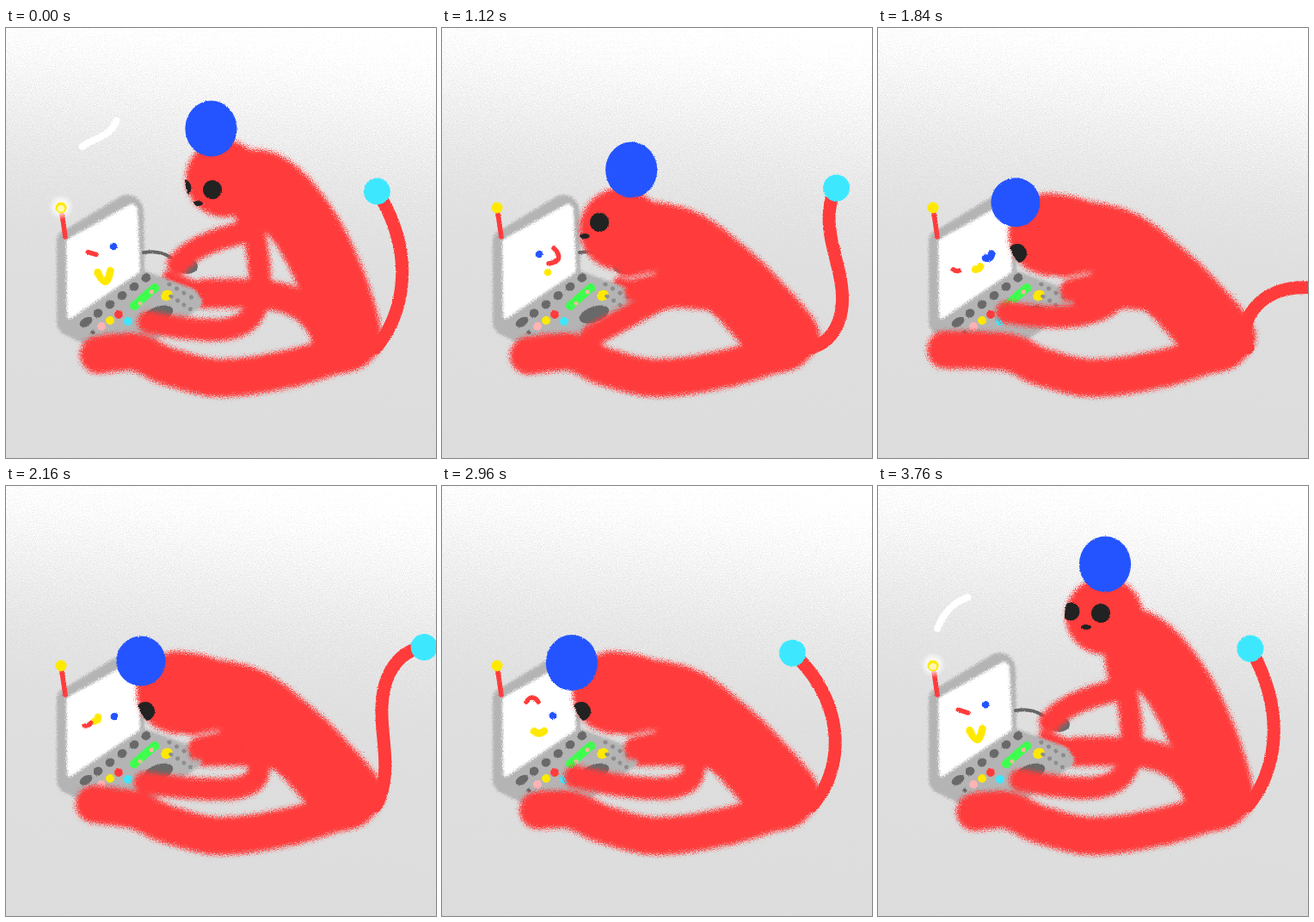
Animation, 500 px wide and 500 px high, one loop 3840 ms. Source, as an HTML page:

```html
<!DOCTYPE html>
<html lang="en">
<head>
<meta charset="utf-8">
<title>Laptop creature</title>
<style>
  html, body { margin: 0; height: 100%; overflow: hidden; background: #fff; }
  svg { display: block; width: 100vw; height: 100vh; }
  .line { fill: none; stroke-linecap: round; stroke-linejoin: round; }
  .red { stroke: #ff3b3b; }
</style>
</head>
<body>
<svg viewBox="0 0 500 500">
  <defs>
    <linearGradient id="sky" x1=".55" y1="0" x2=".45" y2="1">
      <stop offset=".18" stop-color="#fff"/>
      <stop offset=".3" stop-color="#f0f0f0"/>
      <stop offset=".42" stop-color="#e3e3e3"/>
      <stop offset=".55" stop-color="#dedede"/>
      <stop offset="1" stop-color="#dcdcdc"/>
    </linearGradient>
    <radialGradient id="shine">
      <stop offset=".3" stop-color="#fff"/>
      <stop offset="1" stop-color="#fff" stop-opacity="0"/>
    </radialGradient>
    <clipPath id="faceClip"><circle id="faceEdge"/></clipPath>
  </defs>

  <rect x="-100" y="-100" width="700" height="700" fill="url(#sky)" filter="url(#grain)"/>

  <g filter="url(#soft)">
    <path id="tail" class="line red" stroke-width="15"/>
    <circle id="tip" r="15.5" fill="#3de8ff"/>
  </g>

  <g filter="url(#fuzzy)" class="line red">
    <path d="M372 355C345 310 320 307 229 309" stroke-width="34"/>
    <path id="farFoot" stroke-width="16"/>
  </g>

  <g filter="url(#rough)" stroke-linejoin="round">
    <path d="M70 349 160 290 215 310 221 319 165 360 124 375Z" fill="#b4b4b4" stroke="#b4b4b4" stroke-width="15"/>
    <path d="M71 247 138 207Q147 203 148 215L149 284 71 343Z" fill="#b4b4b4" stroke="#b4b4b4" stroke-width="24"/>
    <path d="M73 248 145 208Q150 207 150 214L153 282 74 335Z" fill="#fff" stroke="#fff" stroke-width="6"/>
  </g>
  <g filter="url(#soft)">
    <g id="keys"></g>
    <path class="line" d="M149 323 173 302" stroke="#3dff4d" stroke-width="10"/>
    <g fill="#f5b8a0"><circle cx="156" cy="320" r="2.5"/><circle cx="169" cy="307" r="2.5"/></g>
    <ellipse cx="177" cy="333" rx="18" ry="9" fill="#696969" transform="rotate(-20 177 333)"/>
    <path class="line" d="M160 261Q178 258 192 267" stroke="#666" stroke-width="4"/>
    <ellipse cx="211" cy="277" rx="12" ry="9" fill="#696969"/>
    <g class="line">
      <path id="yellow" stroke="#ffe900" stroke-width="8.5"/>
      <path id="blue" stroke="#2454ff" stroke-width="8.5"/>
      <path id="red" class="red" stroke-width="5.5"/>
    </g>
    <path class="line red" d="M69 243 65 216" stroke-width="5.5"/>
    <circle id="glow" cx="64" cy="208" r="15" fill="url(#shine)"/>
    <circle cx="64" cy="209" r="6.5" fill="#ffe900"/>
    <circle id="spark" cx="64" cy="210" r="4" fill="#fff9b0"/>
    <path id="signal" class="line" d="M64 200C62 165 80 138 103 130 128 120 132 108 132 77" stroke="#fff" stroke-width="8" stroke-dasharray="52 1000"/>
    <circle id="puff" cx="132" cy="77" fill="#fff"/>
  </g>

  <g filter="url(#fuzzy)" fill="#ff3b3b">
    <path id="farArm" class="line red" stroke-width="26"/>
    <path id="torso"/>
    <circle id="head"/>
  </g>
  <g filter="url(#soft)">
    <g clip-path="url(#faceClip)" fill="#222">
      <circle id="eye" r="11"/>
      <circle id="eye2" r="10.5"/>
      <ellipse id="mouth" rx="6" ry="3"/>
    </g>
    <ellipse id="pompom" fill="#2454ff"/>
  </g>
  <g filter="url(#fuzzy)" class="line red">
    <path id="arm" stroke-width="26"/>
    <path id="leg" stroke-width="44"/>
  </g>
</svg>
<script>
const LOOP = 3840, STEP = 80;
const $ = id => document.getElementById(id);
const set = (id, attrs) => { for (const k in attrs) $(id).setAttribute(k, attrs[k]); };
const place = (id, cx, cy) => set(id, { cx, cy });
const clamp = (v, lo = 0, hi = 1) => Math.max(lo, Math.min(hi, v));
const mix = (a, b, u) => a.map((v, i) => v + (b[i] - v) * u);

// Spray textures: [blur, scatter] of every edge.
const textures = { grain: [0, 260], fuzzy: [2.2, 13], rough: [.8, 7], soft: [.4, 2.5] };
$('sky').insertAdjacentHTML('afterend', Object.entries(textures).map(([id, [blur, scale]]) => `
  <filter id="${id}" filterUnits="userSpaceOnUse" x="-100" y="-100" width="700" height="700" color-interpolation-filters="sRGB">
    <feTurbulence type="fractalNoise" baseFrequency=".85" numOctaves="2" seed="4" result="noise"/>
    <feGaussianBlur in="SourceGraphic" stdDeviation="${blur}"/>
    <feDisplacementMap in2="noise" scale="${scale}" xChannelSelector="R" yChannelSelector="G"/>
  </filter>`).join(''));

function key(x, y, r, fill, rx = r) {
  $('keys').innerHTML += `<ellipse cx="${x}" cy="${y}" rx="${rx}" ry="${r}" fill="${fill}" transform="rotate(-30 ${x} ${y})"/>`;
}
for (let i = 0; i < 6; i++) key(93 + 14 * i, 342 - 10.3 * i, 5, '#696969', i ? 5.5 : 8);
['#696969', '#ffb3b3', '#ffe900', '#ff3b3b'].forEach((fill, i) => key(101 + 10 * i, 354 - 7 * i, i ? 5 : 2.5, fill));
key(142, 341, 5, '#3de8ff');
key(187, 311, 6, '#ffe900', 7);
for (let i = 0; i < 8; i++) key(190 + i % 4 * 8.5 + (i > 3) * 2 - (i > 3) * i % 4, 298 + i % 4 * 5 + (i > 3) * 14, 2.5, '#8c8c8c');

// Smooth curve through a flat list of x, y values.
function curve(flat, closed) {
  const n = flat.length / 2;
  const at = i => {
    const k = closed ? (i + n) % n : clamp(i, 0, n - 1);
    return [flat[2 * k], flat[2 * k + 1]];
  };
  let d = 'M' + at(0);
  for (let i = 0; i < (closed ? n : n - 1); i++) {
    const [a, b, c, e] = [at(i - 1), at(i), at(i + 1), at(i + 2)];
    d += `C${b.map((v, j) => v + (c[j] - a[j]) / 6)} ${c.map((v, j) => v - (e[j] - b[j]) / 6)} ${c}`;
  }
  return d + (closed ? 'Z' : '');
}

// Eased value of a looping track of [time, ...values].
function sample(track, t) {
  let i = track.findLastIndex(k => k[0] <= t);
  if (i < 0) i = track.length - 1;
  const [t0, ...a] = track[i], [t1, ...b] = track[(i + 1) % track.length];
  const span = (t1 - t0 + LOOP) % LOOP || LOOP;
  const u = ((t - t0 + LOOP) % LOOP) / span;
  return mix(a, b, u * u * (3 - 2 * u));
}

const upright = [262,150, 305,143, 345,167, 383,215, 413,275, 434,340, 434,375, 405,398, 365,395, 357,365, 341,305, 306,242, 275,238, 264,205];
const bent = [200,200, 255,203, 302,217, 350,252, 395,295, 436,345, 434,375, 405,398, 365,392, 345,365, 308,324, 285,300, 250,284, 205,284];
const heel = [79, 374], reach = [200, 275, 218, 250], tucked = [225, 306, 250, 300], curl = [42, -9, -48, 199];

const tracks = {
  lean: [[0, 0], [560, .13], [1040, 1], [2960, 1], [3680, 0]],
  // Centre, gaze offset, pompom tilt and distance.
  head: [[0, 254,175, -14,13, -15,60], [560, 248,172, -17,17, -29,56], [1120, 208,234, -25,-8, 10,70], [1520, 200,240, -38,22, -46,54], [2960, 200,240, -38,22, -55,60], [3760, 263,151, -4,-3, 1,60]],
  // Hand and elbow bend.
  arm: [[0, 166,342, 1], [560, 182,306, 1], [1120, 174,358, 0], [1520, 138,316, 0], [2160, 162,345, 1], [2960, 155,338, 1]],
  // Hand and elbow.
  farArm: [[0, ...reach], [560, 188,270, 245,290], [1040, ...tucked], [2960, ...tucked], [3600, ...reach]],
  foot: [[0, 108,380], [280, ...heel], [560, 132,350], [840, ...heel], [1120, 101,381], [1360, ...heel], [1520, 88,377], [1840, ...heel], [2160, 103,370], [2560, ...heel], [2960, 112,377], [3360, ...heel], [3760, 113,379]],
  // Heading in degrees at the root, middle and end, then length.
  tail: [[0, 40,-1,-33, 195], [560, -30,95,100, 210], [1120, 75,-12,30, 204], [1320, ...curl], [1520, 105,-4,-52, 229], [1760, -30,95,100, 210], [2160, 30,-2,85, 210], [2320, ...curl], [2960, ...curl], [3280, 75,-12,30, 204], [3760, 40,-1,-30, 195]]
};

// Marks on the screen: centre, half length, turn and bend.
const marks = {
  red: [[0, 100,262, 5,.3,0], [560, 133,288, 4,0,10], [1120, 127,265, 9.5,-1.25,18], [1520, 87,286, 3,.8,1], [2160, 95,277, 4,-.4,3], [2960, 105,251, 7,0,-10], [3760, 99,262, 6,.3,0]],
  blue: [[0, 125,254, .1,0,0], [560, 103,273, 7,.9,10], [1120, 113,263, .1,0,0], [1520, 131,262, 8.5,-1.2,10], [2160, 126,268, .1,0,0], [2960, 129,267, .1,0,0]],
  yellow: [[0, 114,283, 7.5,-.13,24], [560, 105,281, 14,1,20], [1120, 123,284, .1,0,0], [1520, 127,287, 4,-.2,1], [2160, 105,271, 3,-.9,3], [2960, 113,285, 6,0,5], [3760, 114,283, 7.5,-.13,24]]
};

function drawTail([root, middle, end, length]) {
  const steps = 14, points = [430, 372];
  let [x, y] = points;
  for (let i = 0; i < steps; i++) {
    const s = (i + .5) / steps;
    const degrees = root * (1 - s) * (1 - 2 * s) + middle * 4 * s * (1 - s) + end * s * (2 * s - 1);
    const a = degrees * Math.PI / 180;
    points.push(x += Math.sin(a) * length / steps, y -= Math.cos(a) * length / steps);
  }
  set('tail', { d: curve(points) });
  place('tip', x, y);
}

function drawHead([x, y, gazeX, gazeY, tilt, distance], lean) {
  const r = 45 + 3 * lean, a = tilt * Math.PI / 180, stretch = clamp(distance - 56, 0, 4);
  set('head', { cx: x, cy: y, r });
  set('faceEdge', { cx: x, cy: y, r: r + 1 });
  place('eye', x + gazeX, y + gazeY);
  place('eye2', x + gazeX - 35, y + gazeY - 2);
  place('mouth', x + gazeX - 17, y + gazeY + 16);
  set('pompom', { cx: x + Math.sin(a) * distance, cy: y - Math.cos(a) * distance, rx: 28.5 + stretch * .4, ry: 28.5 + stretch });
}

function drawArms([x, y, bend], [fx, fy, ex, ey], lean) {
  const hand = [x, y], shoulder = mix([289, 240], [286, 298], lean), lift = 342 - y;
  const upper = mix(mix(shoulder, hand, 1 / 3), [309, 350], bend);
  const lower = mix(mix(shoulder, hand, 2 / 3), [285 - lift * .8, 365 + lift * .5], bend);
  set('arm', { d: `M${shoulder}C${upper} ${lower} ${hand}` });
  set('farArm', { d: `M${mix([283, 236], [270, 290], lean)}Q${ex} ${ey} ${fx} ${fy}` });
}

function drawMark(id, [x, y, half, turn, bend]) {
  const c = Math.cos(turn), s = Math.sin(turn);
  set(id, { d: `M${x - half * c} ${y - half * s}Q${x - bend * s} ${y + bend * c} ${x + half * c} ${y + half * s}` });
}

// The antenna sends a streak that ends in a fading puff.
function drawSignal(t) {
  const sent = (t - 3680 + LOOP) % LOOP, age = (t - 160) / 400;
  set('signal', { 'stroke-dashoffset': -1 - sent / STEP * 34, opacity: sent < 360 ? 1 : 0 });
  for (const id of ['glow', 'spark']) set(id, { opacity: sent < 480 ? 1 : 0 });
  set('puff', { r: 10 + 17 * clamp(age), opacity: age < 0 ? 0 : clamp(1.65 - age) });
}

function draw(t) {
  const now = {};
  for (const name in tracks) now[name] = sample(tracks[name], t);
  const lean = now.lean[0];

  set('torso', { d: curve(mix(upright, bent, lean), true) });
  drawHead(now.head, lean);
  drawArms(now.arm, now.farArm, lean);
  drawTail(now.tail);
  set('leg', { d: curve([...now.foot, 150,377, 190,394, 250,407, 330,396, 402,374]) });
  const tap = clamp(1.6 * Math.cos(t / LOOP * 6 * Math.PI) - .6);
  set('farFoot', { d: `M235 309L${225 - 35 * tap} ${306 - 16 * tap}` });
  for (const id in marks) drawMark(id, sample(marks[id], t));
  drawSignal(t);
}

let last = -1;
function frame(ms) {
  const t = Math.floor(ms % LOOP / STEP) * STEP;
  if (t !== last) draw(last = t);
  requestAnimationFrame(frame);
}
draw(0);
requestAnimationFrame(frame);
</script>
</body>
</html>
```
